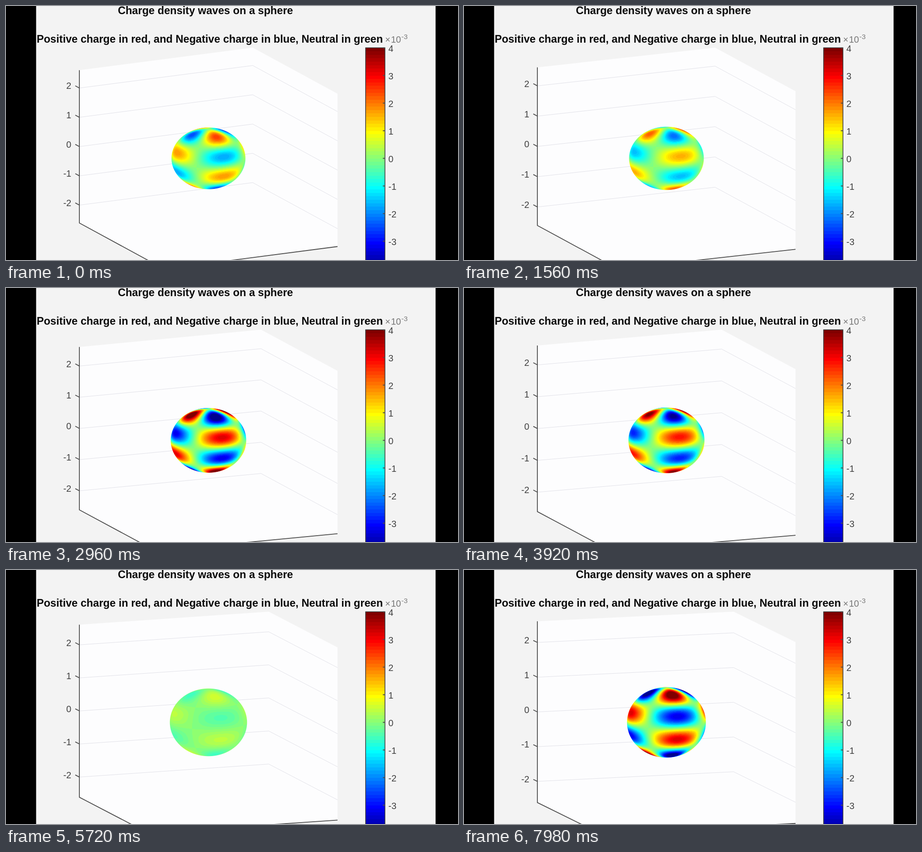
These frames come from a looping animation (998x561 px, 8000 ms). An HTML page with a canvas:

```html
<!DOCTYPE html>
<html lang="en">
<head>
<meta charset="utf-8">
<title>Charge density waves on a sphere</title>
<style>
  html, body { margin: 0; width: 100%; height: 100%; overflow: hidden; background: #000; }
  svg, canvas { position: absolute; display: block; }
  svg { left: 0; top: 0; }
  canvas { left: 347px; top: 246px; }
  text { font-family: "Liberation Sans", Arial, sans-serif; font-size: 20px; fill: #404040; }
  .title { font-size: 23.6px; font-weight: bold; fill: #0a0a0a; text-anchor: middle; }
  .exp { fill: #777; }
  .axis { fill: none; stroke: #4c4c4c; stroke-width: 1.8; }
  .grid { fill: none; stroke: #e1e1e8; stroke-width: 1; }
</style>
</head>
<body>
<svg id="stage" width="998" height="561" viewBox="0 0 998 561">
  <rect width="998" height="561" fill="#000"/>
  <rect x="66.5" width="882" height="561" fill="#f3f3f3"/>
  <path id="walls" fill="#fdfdfe"/>
  <path id="grid" class="grid"/>
  <path id="axes" class="axis"/>
  <g id="zLabels" text-anchor="end"></g>
  <text class="title" x="440.3" y="18.3">Charge density waves on a sphere</text>
  <text class="title" x="449.9" y="81">Positive charge in red, and Negative charge in blue, Neutral in green</text>
  <text class="exp" x="837" y="81">×</text>
  <text class="exp" x="850" y="81">10</text>
  <text class="exp" x="873" y="73" style="font-size:15.5px">-3</text>
  <g id="bar" shape-rendering="crispEdges"></g>
  <rect x="794" y="92.3" width="42.7" height="488" fill="none" stroke="#333" stroke-width="1.5"/>
  <path id="barTicks" class="axis"/>
  <g id="barLabels"></g>
</svg>
<canvas id="ball" width="200" height="180"></canvas>
<script>
const LOOP = 8000, RAD = Math.PI / 180;
const LEFT = 162, WIDTH = 570, TOP = 92, HEIGHT = 489, LIMIT = 2.61;
const BALL_X = 347, BALL_Y = 246;
const BAR_MID = 336.5, BAR_UNIT = 61, SHADES = 64;
const $ = id => document.getElementById(id);
const clamp = x => Math.max(0, Math.min(1, x));
const ctx = $('ball').getContext('2d');
const img = ctx.createImageData(200, 180);

function add(parent, tag, attrs, text = '') {
  const el = document.createElementNS('http://www.w3.org/2000/svg', tag);
  for (const key in attrs) el.setAttribute(key, attrs[key]);
  el.textContent = text;
  return parent.appendChild(el);
}

// Jet colour map in 64 shades, numbered from 1
const jet = Array.from({ length: SHADES }, (_, k) =>
  [48, 32, 16].map(mid => Math.round(255 * clamp((24 - Math.abs(k + 1 - mid)) / 16))));
const colour = v => jet[Math.max(0, Math.min(SHADES - 1, Math.floor((v + 4) * 8)))];

jet.forEach((c, k) => add($('bar'), 'rect', {
  x: 794, width: 42.7, y: BAR_MID + BAR_UNIT * (4 - (k + 1) / 8), height: BAR_UNIT / 8, fill: `rgb(${c})`
}));
let marks = '';
for (let v = 4; v >= -3; v--) {
  const y = BAR_MID - BAR_UNIT * v;
  marks += `M832 ${y}H836.5`;
  add($('barLabels'), 'text', { x: 844.3, y: y + 8 }, v);
}
$('barTicks').setAttribute('d', marks);
const zLabels = [-2, -1, 0, 1, 2].map(z => add($('zLabels'), 'text', { x: 144.2 }, z));

// Updates come in threes: two short, one long
function stepAt(t) {
  const s = t + 20;
  return 3 * Math.floor(s / 140) + Math.min(2, Math.floor(s % 140 / 20));
}

function drawBox(sa, ca, tanE, zLen) {
  const backX = LEFT + WIDTH * ca / (sa + ca), right = LEFT + WIDTH;
  const frontX = LEFT + right - backX;
  const leftY = TOP + sa * tanE * zLen, rightY = TOP + ca * tanE * zLen;
  const slope = (rightY - TOP) / (right - backX);
  const floor = `L${LEFT} ${leftY + zLen}L${frontX} ${TOP + HEIGHT}L${right} ${rightY + zLen}`;
  $('walls').setAttribute('d', `M${right} ${rightY}L${backX} ${TOP}L${LEFT} ${leftY}${floor}Z`);
  let grid = '', axes = `M${LEFT} ${leftY}${floor}`;
  zLabels.forEach((label, i) => {
    const d = zLen * (0.5 - (i - 2) / (2 * LIMIT));
    grid += `M${LEFT} ${leftY + d}L${backX} ${TOP + d}L${right} ${rightY + d}`;
    axes += `M${LEFT} ${leftY + d}l-9 ${-9 * slope}`;
    label.setAttribute('y', leftY + d + 2.3);
  });
  $('grid').setAttribute('d', grid);
  $('axes').setAttribute('d', axes);
}

// Four bands of charge from pole to pole, two waves around the equator
function charge(x, y, z) {
  const ring = Math.max(1e-6, 1 - z * z);
  return z * (z * z - 0.375) * (y * y - x * x) / Math.pow(ring, 0.25);
}

function drawBall(sa, ca, se, ce, rx, ry, amp) {
  const cx = LEFT + WIDTH / 2 - BALL_X, cy = TOP + HEIGHT / 2 - BALL_Y;
  const data = img.data;
  data.fill(0);
  for (let j = 0, p = 0; j < 180; j++) {
    for (let i = 0; i < 200; i++, p += 4) {
      let u = (i + 0.5 - cx) / rx, v = (cy - j - 0.5) / ry;
      const r = Math.hypot(u, v), alpha = clamp((1 - r) * (rx + ry) / 2 + 0.5);
      if (!alpha) continue;
      if (r > 1) { u /= r; v /= r; }
      const w = Math.sqrt(Math.max(0, 1 - u * u - v * v));
      const z = v * ce + w * se, h = w * ce - v * se;
      const x = u * ca - h * sa, y = u * sa + h * ca;
      data.set(colour(amp * charge(x, y, z)), p);
      data[p + 3] = 255 * alpha;
    }
  }
  ctx.putImageData(img, 0, 0);
}

function draw(n) {
  const az = (26.1 - 0.05 * n) * RAD, el = az - 7.5 * RAD;
  const sa = Math.sin(az), ca = Math.cos(az), se = Math.sin(el), ce = Math.cos(el);
  const zLen = HEIGHT / (1 + (sa + ca) * se / ce);
  const amp = -40.5 * Math.cos((n - 69) * Math.PI / 100);
  drawBox(sa, ca, se / ce, zLen);
  drawBall(sa, ca, se, ce, WIDTH / (sa + ca) / (2 * LIMIT), zLen / ce / (2 * LIMIT), amp);
}

let shown = -1;
const start = performance.now();
function tick() {
  const n = stepAt((performance.now() - start) % LOOP);
  if (n !== shown) draw(shown = n);
  requestAnimationFrame(tick);
}
tick();
</script>
</body>
</html>
```
